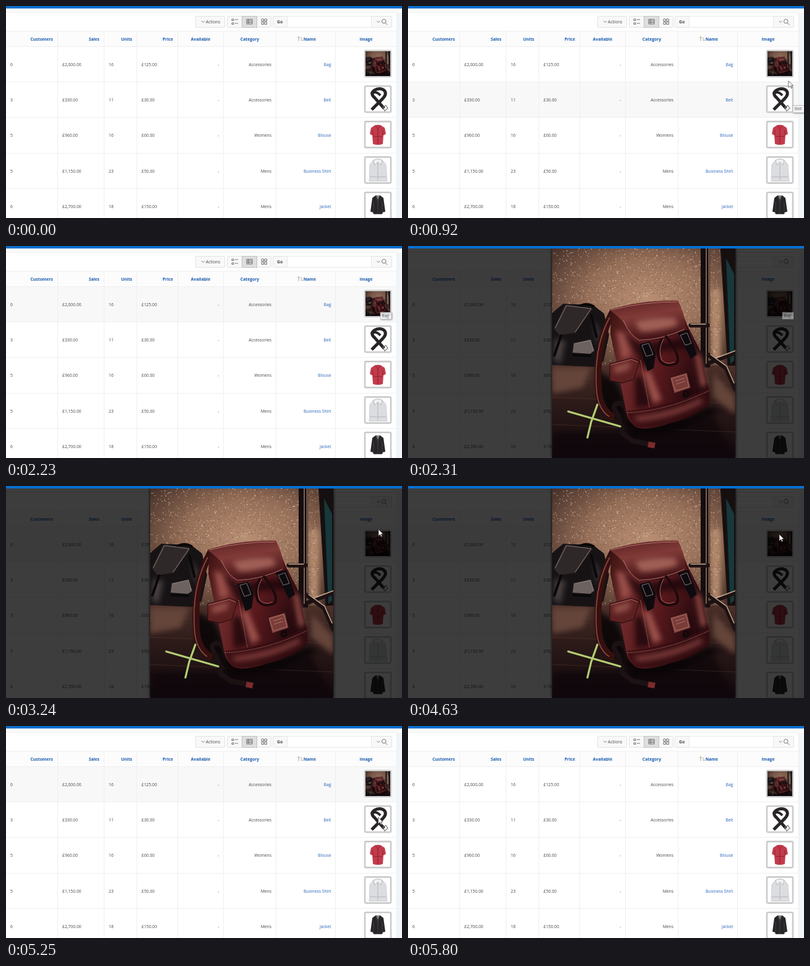
These frames come from a looping animation (640x342 px, 6.56 s). An HTML page:

```html
<!DOCTYPE html>
<html lang="en">
<head>
<meta charset="utf-8">
<title>Product report</title>
<style>
html, body { margin: 0; width: 100%; height: 100%; overflow: hidden; background: #fff; }
svg { display: block; }
text { font: 6.8px "Open Sans", "Noto Sans", sans-serif; fill: #484848; }
.head { font-weight: 700; fill: #1c5bb0; }
.strong { font-weight: 700; }
.link { fill: #2a66bd; }
.end { text-anchor: end; }
.mid { text-anchor: middle; }
.line { fill: none; stroke: #efefef; }
.icon { fill: none; stroke: #666; stroke-width: .9; }
.button { fill: #f8f8f8; stroke: #e2e2e2; }
.tip rect { fill: #f1f2f2; stroke: #b5b5b5; stroke-width: .7; filter: drop-shadow(1px 1px 1px #0006); }
.tip text { font-size: 6.4px; fill: #5d6668; }
.soft { filter: blur(4px); }
</style>
</head>
<body>
<svg id="stage" width="640" height="342" viewBox="0 0 640 342">
  <defs>
    <radialGradient id="wall" cx=".52" cy=".42" r=".65">
      <stop offset="0" stop-color="#b98f73"/><stop offset=".5" stop-color="#977059"/><stop offset="1" stop-color="#49322a"/>
    </radialGradient>
    <linearGradient id="wood" x2="0" y2="1">
      <stop offset="0" stop-color="#4b3029"/><stop offset=".4" stop-color="#2c1a19"/><stop offset="1" stop-color="#12090d"/>
    </linearGradient>
    <linearGradient id="leather" x2="1" y2=".4">
      <stop offset="0" stop-color="#35100f"/><stop offset=".3" stop-color="#6f2a2b"/><stop offset=".6" stop-color="#59191d"/><stop offset="1" stop-color="#260a0e"/>
    </linearGradient>
    <linearGradient id="flap" x2=".3" y2="1">
      <stop offset="0" stop-color="#581f20"/><stop offset=".45" stop-color="#803a37"/><stop offset="1" stop-color="#451417"/>
    </linearGradient>
    <clipPath id="frame"><path d="M233 4h296v338H233z"/></clipPath>
    <g id="photo" clip-path="url(#frame)">
      <path fill="url(#wall)" d="M233 4h296v195H233z"/>
      <path fill="#b58b6e" class="soft" d="M490 70h15v120h-15z"/>
      <path id="shade" stroke="#442c24" opacity=".55"/>
      <path id="glitter" stroke="#ffeeda" opacity=".8"/>
      <path fill="#160f10" d="M505 4h24v198h-12z"/>
      <path fill="#17393b" d="M514 20l13 25v140l-6 5z"/>
      <path fill="url(#wood)" d="M233 193h296v149H233z"/>
      <g class="soft">
        <path fill="#65453a" d="M233 196h62l-12 32-50 10zM494 206l35 36v30l-36-28z"/>
        <path fill="#0d070a" d="M233 300h130l130-26 36 68H233z" opacity=".7"/>
      </g>
      <path fill="none" stroke="#6b4b3d" stroke-width=".6" opacity=".6" d="M233 212l296 9M233 244l296 10M233 288l296 12"/>
      <path fill="#150d0f" d="M473 4h15v192h-15z"/>
      <path stroke="#b18c72" stroke-width="1.3" d="M482 4v186M486.500 4v186"/>
      <g fill="none" stroke-linecap="round">
        <path stroke="#1d1113" stroke-width="7" d="M457 128h27M486 176l28 21 15 34M488 188l41-16"/>
        <path stroke="#ceb096" stroke-width="1.5" d="M457 126h24M489 175l26 19 12 27M497 181l32-12"/>
      </g>
      <path fill="#171315" d="M233 108l18-15 48 2 18 14 8 35-9 42-15 9-68-3z"/>
      <path fill="#2f2828" d="M236 133l18-38 44 6-27 39-26 4z"/>
      <path fill="#6c6260" d="M268 157l27-6 6 18-7 5-28-2z"/>
      <path fill="#494041" class="soft" d="M238 150l16 4-8 36-10-6zM300 118l10 22-4 22z"/>
      <path fill="none" stroke="#0a0809" stroke-width="4" d="M248 143l-12 35M276 98q12-8 25 0M296 110l9 38M266 176l30 1"/>
      <path fill="none" stroke="#8a7c76" d="M238 132l18-36 40 5-26 38M268 158l27-6 4 16"/>
      <path fill="#080406" class="soft" opacity=".85" d="M335 268q60 38 153-9l17 8-74 33-71 7zM304 200l34 20 18 50-20 10-26-20z"/>
      <path fill="none" stroke="#35100f" stroke-width="11" d="M331 106Q302 160 308 235q3 30 25 42"/>
      <path fill="none" stroke="#8d4b45" stroke-width="1.6" d="M326 115Q299 165 305 236q3 28 20 39"/>
      <path fill="none" stroke="#1c1113" stroke-width="8" d="M354 268q-4-17-17-14-9 5 3 20l7 29 17 12 35 6"/>
      <path stroke="#7a2b2d" stroke-width="9" d="M388 320l11 2"/>
      <path fill="url(#leather)" d="M328 106q44-18 108-17l15 38 22 43 14 66v18q-19 22-61 31-43 15-59 6-13-10-16-31l-14-71-10-47z"/>
      <g class="soft">
        <path fill="#9b514b" d="M336 136l14 6 10 34-14 6zM380 204l10-4 20 48-14 6zM464 172l8 4 10 48-8 4z"/>
        <path fill="#1c070a" d="M352 142l24 16 74-10 8 18-50 4-28 26zM366 214l12-6 16 48-26 6zM452 190l8 56-16 8z" opacity=".8"/>
      </g>
      <path fill="#350e12" opacity=".8" d="M354 266q63-5 133-38v25q-20 20-62 31-42 14-58 6-9-7-13-24z"/>
      <path fill="#8a4340" class="soft" d="M366 276q60-6 108-30l2 6q-48 26-106 30z"/>
      <path fill="none" stroke="#b9776f" stroke-width=".8" stroke-dasharray="2 1" d="M354 269q65-3 133-36M376 184l14 76"/>
      <path fill="url(#flap)" d="M325 103q50-16 111-15 10 17 13 44l-6 6q-32 16-68 16-14-9-24-27-10-14-26-24z"/>
      <path fill="#a05f56" class="soft" d="M366 122q36-8 66-6l4 12q-34 10-60 10z"/>
      <path fill="none" stroke="#c08880" stroke-width=".8" d="M329 103q50-13 106-13M348 120q11 25 26 32 37-1 73-18"/>
      <path fill="#5d2021" stroke="#240a0c" d="M326 190l35-9 13 5-9 29-19 6-20-4z"/>
      <path fill="#94504a" class="soft" d="M332 194l30-8-6 14-22 6z"/>
      <path fill="none" stroke="#b9776f" stroke-width=".8" d="M327 192l34-9 10 4"/>
      <path fill="#0e0b0e" d="M374 158l17-4 9 20-3 23-10 5zM436 140l17-5 14 40-10 7z"/>
      <path fill="none" stroke="#817478" d="M378 160l11-3 7 18-11 3zM440 144l11-4 7 17-10 3z"/>
      <path fill="none" stroke="#1d090c" stroke-width="4" d="M411 149q-11 19-4 36 10 12 27 4 9-10-18-44"/>
      <path fill="none" stroke="#a8625a" d="M413 150q-10 18-3 34 9 9 21 3"/>
      <path fill="#7a3c38" stroke="#2a0d0f" d="M423 212l28-8 6 25-27 9z"/>
      <path fill="none" stroke="#c08880" stroke-width=".7" d="M426 214l23-7 5 20-22 7zM432 218l15-5M433 223l15-5"/>
      <circle cx="449" cy="239" r="4" fill="none" stroke="#0d090b" stroke-width="2.500"/>
      <path fill="none" stroke="#b4cf74" stroke-width="3.200" stroke-linecap="round" d="M259 267l84 24M306 256l-10 28-6 25"/>
    </g>
    <g id="belt" fill="none" stroke="#292526" stroke-width="5">
      <path d="M12 39l18-18q8-9 1-14-7-4-15 1-7 5 1 12l15 17"/>
      <path d="M11 13q8-5 15 3" stroke-width="4"/>
      <path d="M30 35l5-3 3 5-5 4z" stroke="#777" stroke-width="1.200"/>
    </g>
    <g id="blouse">
      <path fill="#c23b4b" d="M17 7l5-1 5 1 6 4 2 10-4 2-1 14q-8 3-16 0l-1-14-4-2 2-10z"/>
      <path fill="none" stroke="#842032" stroke-width=".9" d="M18 7l4 6 4-6M22 13v24M14 15l0 8M30 15l0 8M15 25h14"/>
    </g>
    <g id="shirt">
      <path fill="#dcdde0" stroke="#c3c5c9" stroke-width=".7" d="M15 6l7-2 7 2 6 7 2 27H8l1-27z"/>
      <path fill="#f1f1f3" stroke="#a5a8ad" stroke-width=".7" d="M15 6l7-2 7 2-2 8-5-5-5 5zM22 10v29M9 33h26"/>
    </g>
    <g id="jacket">
      <path fill="#272527" d="M18 6h8l5 4 3 22-4 1-1 3H15l-1-3-4-1 3-22z"/>
      <path fill="#8c898b" d="M19.500 6h5l-2.500 7z"/>
      <path fill="none" stroke="#4b484b" stroke-width=".8" d="M19 6l3 11 3-11M22 17v18M15 16v17M29 16v17"/>
    </g>
    <g id="bag">
      <svg x="2" y="2" width="40" height="40" viewBox="233 24 296 296" preserveAspectRatio="none"><use href="#photo"/></svg>
      <path fill="#120b10" opacity=".25" d="M2 2h40v40H2z"/>
    </g>
  </defs>
  <path fill="#fbfbfb" d="M0 4h640v7H0z"/>
  <path fill="#eff5f8" d="M632 11h8v331h-8z"/>
  <path class="line" d="M0 10.500h631.500V342"/>
  <g id="toolbar">
    <rect class="button" x="306.500" y="16.500" width="47" height="18" rx="1"/>
    <rect class="button" x="357.500" y="16.500" width="71" height="18" rx="1"/>
    <rect x="381.500" y="16.500" width="24" height="18" fill="#dedede" stroke="#c2c2c2"/>
    <rect class="button" x="431.500" y="16.500" width="192" height="18" rx="1"/>
    <path fill="#fff" stroke="#e8e8e8" d="M454.500 16.500h136v18h-136z"/>
    <text x="323" y="28">Actions</text>
    <text x="438" y="28" class="strong">Go</text>
    <path class="icon" d="M316 24l2.500 2.500 2.500-2.500M365 21h3v2.500h-3zM365 27h3v2.500h-3zM370 22h5M370 28h5M389 21.500h9v7.500h-9zM389 24h9M389 26.500h9M392 21.500v7.500M413 21h3.500v3.500h-3.500zM418 21h3.500v3.500h-3.500zM413 26h3.500v3.500h-3.500zM418 26h3.500v3.500h-3.500z"/>
    <path class="icon" style="stroke:#4f79a8" d="M599.500 24l2.500 2.500 2.500-2.500"/>
    <path class="icon" d="M613.500 27.500l3 3M607.500 24.700a3.300 3.300 0 1 0 6.600 0a3.300 3.300 0 1 0 -6.600 0"/>
  </g>
  <g id="table"></g>
  <g id="dialog">
    <path fill="#000" opacity=".76" d="M0 4h640v338H0z"/>
    <path fill="#000" d="M233 4h296v338H233z" style="filter:drop-shadow(0 0 2px #000)"/>
    <use href="#photo"/>
  </g>
  <path fill="#0670cf" d="M0 0h640v4H0z"/>
  <g id="beltTip" class="tip"><rect x="622" y="160.500" width="24" height="11.500"/><text x="625" y="168.300">Belt</text></g>
  <g id="bagTip" class="tip"><rect x="605" y="107" width="18" height="11"/><text x="607.500" y="114.700">Bag</text></g>
  <path id="cursor" fill="#fff" stroke="#333" stroke-width=".7" d="M0 0V10.500L2.600 8.200 4.400 12 6 11.300 4.300 7.600 7.600 7.400Z"/>
</svg>
<script>
const LOOP = 6560, ROW_TOP = 66, ROW_HEIGHT = 57.2;
const $ = id => document.getElementById(id);

const headers = [
  ['Customers', 76, 'end'], ['Sales', 151, 'end'], ['Units', 204, 'end'], ['Price', 270, 'end'],
  ['Available', 314.5, 'mid'], ['Category', 394, 'mid'], ['Name', 501, 'end'], ['Image', 582, 'mid']
];
const cells = [[7, ''], [91, ''], [166, ''], [219, ''], [344.5, 'end'], [429, 'end'], [525.5, 'end link']];
const products = [
  ['6', '£2,000.00', '16', '£125.00', '-', 'Accessories', 'Bag', 'bag'],
  ['3', '£330.00', '11', '£30.00', '-', 'Accessories', 'Belt', 'belt'],
  ['5', '£960.00', '16', '£60.00', '-', 'Womens', 'Blouse', 'blouse'],
  ['5', '£1,150.00', '23', '£50.00', '-', 'Mens', 'Business Shirt', 'shirt'],
  ['6', '£2,700.00', '18', '£150.00', '-', 'Mens', 'Jacket', 'jacket']
];

const label = (text, x, y, style) => `<text x="${x}" y="${y}" class="${style}">${text}</text>`;

function productRow(product, i) {
  const top = ROW_TOP + i * ROW_HEIGHT;
  const texts = cells.map(([x, style], c) => label(product[c], x, top + 31, style)).join('');
  return `<rect class="row" y="${top}" width="631" height="${ROW_HEIGHT}" fill="#fff"/>
    <path class="line" d="M0 ${Math.round(top) - .5}h631"/>${texts}
    <g transform="translate(579 ${top + 5})">
      <rect x="1" y="1" width="42" height="42" rx="2" fill="#fff" stroke="#cbcbcb" stroke-width="2.6"/>
      <use href="#${product[7]}"/>
    </g>`;
}

function buildTable() {
  const dividers = [83, 158, 211, 277, 351, 436, 532].map(x => `M${x}.5 40V342`).join('');
  $('table').innerHTML = `<path fill="#fcfcfc" d="M0 40h631v26H0z"/><path class="line" d="M0 40.5h631"/>`
    + products.map(productRow).join('')
    + `<path class="line" d="${dividers}"/>`
    + headers.map(([text, x, style]) => label(text, x, 55.5, 'head ' + style)).join('')
    + `<path class="icon" style="stroke:#a99a83" d="M473 56.5v-7l-2 2m2-2l2 2M476.5 51h1.5M476.5 53.2h2.5M476.5 55.4h3.5"/>`;
}

// Random specks over the photo's back wall.
function scatter(id, count, seed) {
  let path = '';
  const random = () => (seed = seed * 16807 % 2147483647) / 2147483647;
  for (let i = 0; i < count; i++) {
    path += `M${(233 + random() * 272).toFixed(1)} ${(4 + random() * 188).toFixed(1)}h${(.5 + random()).toFixed(1)}`;
  }
  $(id).setAttribute('d', path);
}

// Each visible stretch of pointer movement: [time, x, y].
const tracks = [
  [[70, 621, 215], [230, 621, 148], [680, 621, 148], [920, 615, 121], [1150, 604, 95], [2160, 604, 95]],
  [[2390, 603, 87], [2700, 603, 87], [2930, 596, 70], [3160, 597, 70], [3240, 602, 70], [4629, 602, 70],
   [4630, 600, 78], [5090, 600, 78], [5710, 606, 345]]
];

function pointerAt(t) {
  for (const track of tracks) {
    for (let i = 1; i < track.length; i++) {
      const [t0, x0, y0] = track[i - 1], [t1, x1, y1] = track[i];
      if (t >= t0 && t < t1) {
        const k = (t - t0) / (t1 - t0);
        return [x0 + (x1 - x0) * k, y0 + (y1 - y0) * k];
      }
    }
  }
  return null;
}

const show = (id, visible) => { $(id).style.display = visible ? '' : 'none'; };

function draw(now) {
  const t = (now - start) % LOOP;
  const open = t >= 2310 && t < 4710;
  const pointer = pointerAt(t);
  // Row highlighting trails the pointer slightly.
  const hover = pointerAt(t - 80);
  const hoverRow = hover ? Math.floor((hover[1] - ROW_TOP) / ROW_HEIGHT) : -1;
  rows.forEach((row, i) => row.setAttribute('fill', i === hoverRow ? '#f8f8f8' : '#fff'));
  show('dialog', open);
  show('beltTip', t >= 530 && t < 1070);
  show('bagTip', t >= 1530 && t < 2390);
  $('bagTip').style.opacity = open ? .5 : .9;
  show('cursor', pointer);
  if (pointer) $('cursor').setAttribute('transform', `translate(${pointer})`);
  requestAnimationFrame(draw);
}

buildTable();
scatter('shade', 1500, 31);
scatter('glitter', 1100, 7);
const rows = document.querySelectorAll('.row');
const start = document.timeline.currentTime || 0;
draw(start);
</script>
</body>
</html>
```
